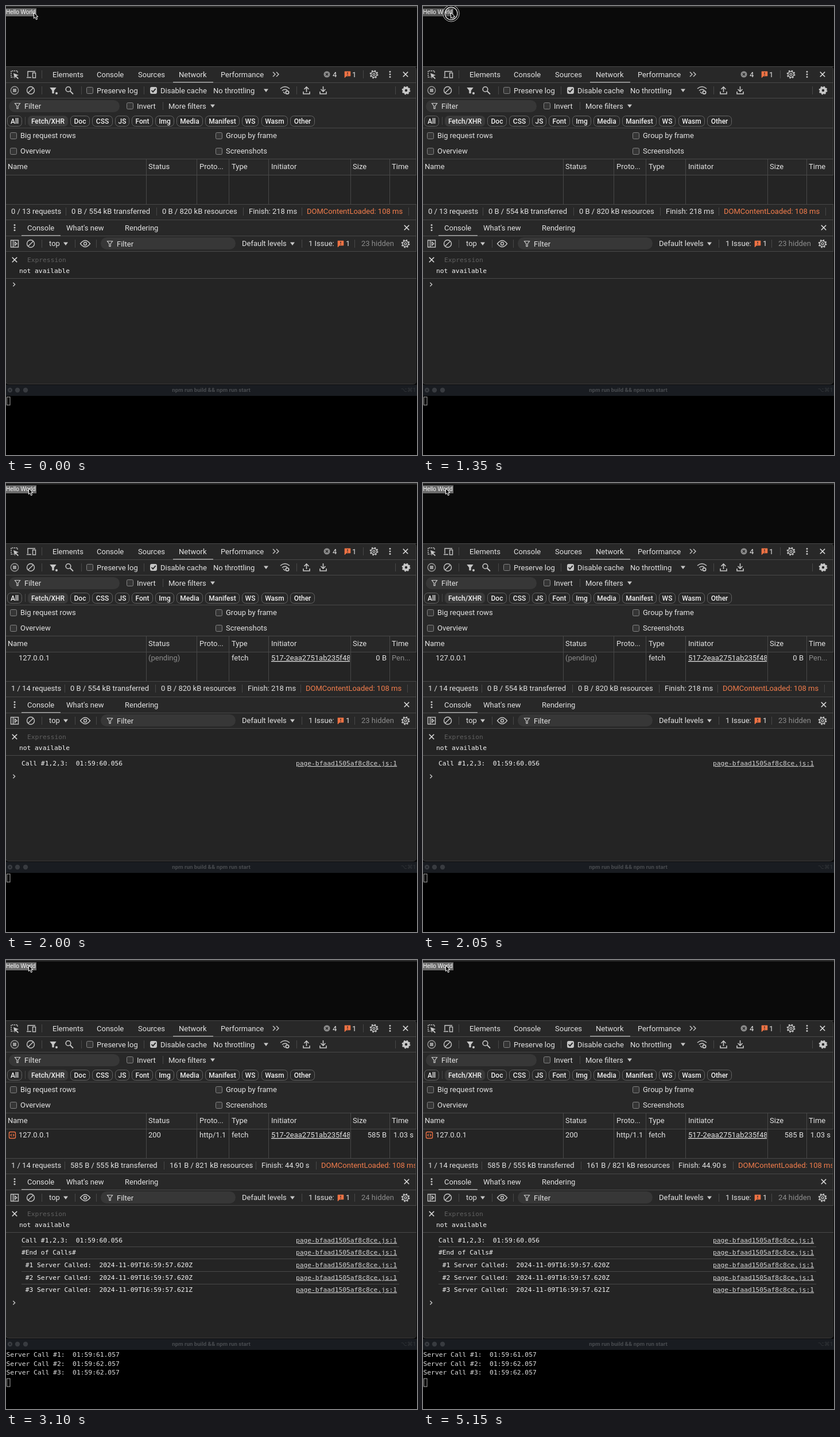
Animation, 716 px wide and 782 px high, one loop 5.2 s. Source, as an HTML page:

```html
<!DOCTYPE html>
<html lang="en">
<head>
<meta charset="utf-8">
<title>Network panel</title>
<style>
html, body { margin: 0; width: 100%; height: 100%; overflow: hidden; background: #000; }
svg { display: block; width: 716px; height: 782px; }
text { font: 13px Roboto, sans-serif; fill: #e3e3e3; white-space: pre; }
text.chip { font-size: 12px; font-weight: 500; fill: #f0f0f0; }
text.mono { font: 11.25px "DejaVu Sans Mono", monospace; fill: #f6f6f6; }
text.term { font: 11.3px "DejaVu Sans Mono", monospace; fill: #dedede; }
text.title { font-size: 9.7px; font-weight: 700; fill: #484b4f; text-anchor: middle; }
text.hint { font-size: 9.7px; fill: #33363a; text-anchor: middle; }
text.page { font: 10px "Liberation Sans", Arial, sans-serif; fill: #fff; }
text.dim { fill: #8c8c8c; }
text.faint { fill: #606060; }
text.hot { fill: #f27d4c; }
text.end { text-anchor: end; }
text.link { text-decoration: underline; text-decoration-thickness: 1px; }
text.mono.link { fill: #d4d4d4; }
</style>
</head>
<body>
<svg id="stage" viewBox="0 0 716 782"></svg>
<script>
const NS = 'http://www.w3.org/2000/svg';
const LOOP = 5200;
const PRESS = 550, RING = 600, RELEASE = 1700;
const REQUEST = 2000, ICON = 3000, RESPONSE = 3100;
const INK = '#c7c7c7', LINE = '#484848', HOT = '#ee7244';

const stage = document.getElementById('stage');
let layer = stage;

function add(tag, attrs, parent = layer) {
  const node = document.createElementNS(NS, tag);
  for (const key in attrs) node.setAttribute(key, attrs[key]);
  return parent.appendChild(node);
}

function group(draw) {
  const outer = layer;
  const node = add('g', {});
  layer = node;
  draw();
  layer = outer;
  return node;
}

const rect = (x, y, width, height, fill, more) => add('rect', { x, y, width, height, fill, ...more });
const circle = (cx, cy, r, more) => add('circle', { cx, cy, r, fill: 'none', stroke: INK, 'stroke-width': 1.4, ...more });
const path = (d, more) => add('path', { d, fill: 'none', stroke: INK, 'stroke-width': 1.4, ...more });
const hline = (y, x = 0, end = 715) => rect(x, y, end - x, 1, LINE);
const vline = (x, y, height) => rect(x, y, 1, height, LINE);
const divider = (x, cy) => vline(x, cy - 7, 14);

// Text is placed by its left edge and vertical middle.
function label(x, cy, text, cls = '') {
  const drop = /mono|term/.test(cls) ? 3 : 4;
  const node = add('text', { x, y: cy + drop, class: cls });
  node.textContent = text;
  return node;
}

const caret = (x, y) => path(`M${x - 4} ${y - 2.5}h8l-4 5.5z`, { fill: INK, stroke: 'none' });
const cross = (x, y, r = 4.2) => path(`M${x - r} ${y - r}l${2 * r} ${2 * r}m0 ${-2 * r}l${-2 * r} ${2 * r}`, { stroke: '#ddd', 'stroke-width': 1.6 });
const funnel = (x, y, fill = 'none') => path(`M${x - 4.5} ${y - 4.5}h9l-3.4 4.6v4.6h-2.2v-4.6z`, { fill, 'stroke-width': 1.2 });
const chevron = (x, y, r = 4) => path(`M${x - r / 2} ${y - r}l${r} ${r}l${-r} ${r}`);

function kebab(x, y) {
  for (const dy of [-4.5, 0, 4.5]) circle(x, y + dy, 1.5, { fill: INK, stroke: 'none' });
}

function gear(x, y, solid) {
  circle(x, y, solid ? 4.2 : 5, { 'stroke-width': solid ? 4 : 1.4 });
  circle(x, y, 6.4, { 'stroke-width': 2, 'stroke-dasharray': '2.51 2.51' });
  if (!solid) circle(x, y, 1.9, { 'stroke-width': 1.3 });
}

function clearIcon(x, y) {
  circle(x, y, 6.5);
  path(`M${x - 4.6} ${y + 4.6}l9.2 -9.2`);
}

function checkbox(x, y, on) {
  rect(x - 5.5, y - 5.5, 11, 11, on ? '#c4c4c4' : '#353535', { rx: 2, stroke: on ? '#c4c4c4' : '#858585' });
  if (on) path(`M${x - 3.5} ${y}l2.5 2.7l4.7 -5.5`, { stroke: '#222', 'stroke-width': 1.8 });
}

function issueBadge(x, y) {
  path(`M${x - 5} ${y - 5}h10v8h-7l-3 3z`, { fill: HOT, stroke: HOT, 'stroke-width': 0.6 });
  path(`M${x} ${y - 3.5}v3m0 1.2v1.3`, { stroke: '#2b2b2b' });
}

function pageArea() {
  rect(0, 0, 716, 106, '#0a0a0a');
  rect(0, 0, 716, 2.5, '#2b2b2b');
  rect(0, 4, 53, 14, '#6b6b6b', { id: 'button' });
  label(0, 10, 'Hello World', 'page');
}

function tabBar() {
  path('M20 116v-3h-11v11h4', { 'stroke-dasharray': '2.2 1.3' });
  path('M13 117l9 3.4l-4 1.5l4 4l-1.4 1.4l-4 -4l-1.5 3.5z', { fill: INK, stroke: 'none' });
  path('M38 123v-9h13M36 124.5h8');
  rect(46.5, 116.5, 5, 8.5, 'none', { stroke: INK, 'stroke-width': 1.4 });
  divider(62, 119);
  [[81, 'Elements'], [158, 'Console'], [230, 'Sources'], [301, 'Network'], [374, 'Performance']]
    .forEach(([x, name]) => label(x, 120, name));
  chevron(467, 119);
  chevron(473, 119);
  circle(559, 119, 5.5, { fill: '#8b8b8b', stroke: 'none' });
  path('M557 117l4 4m0 -4l-4 4', { stroke: '#282828' });
  label(569, 120, '4');
  issueBadge(595, 119);
  label(603, 120, '1');
  divider(622, 119);
  gear(641, 119);
  kebab(669, 119);
  cross(696, 119);
  hline(133);
  rect(291, 132, 70, 1.5, '#a5a5a5');
}

function networkTools() {
  circle(15, 147, 6.7, { stroke: '#999' });
  rect(12, 144, 6, 6, '#999');
  clearIcon(43, 147);
  divider(62, 147);
  funnel(82, 147, INK);
  circle(88, 152, 2, { fill: INK, stroke: 'none' });
  circle(108.5, 145, 4.3, { 'stroke-width': 1.6 });
  path('M111.5 148l5.5 5.5', { 'stroke-width': 1.8 });
  divider(131, 147);
  checkbox(146, 147);
  label(158, 147.5, 'Preserve log');
  divider(240, 147);
  checkbox(257, 147, true);
  label(269, 147.5, 'Disable cache');
  label(361, 147.5, 'No throttling');
  caret(453, 147);
  path('M478 144q8 -7 16 0M481 147.5q5 -4 9 -1M483 149.5l3 3');
  circle(490, 150.5, 2.7, { 'stroke-width': 1.8 });
  divider(506, 147);
  path('M518 149v4h11v-4M523.5 150v-9m-4 4l4 -4l4 4', { 'stroke-width': 1.6 });
  path('M547 149v4h11v-4M552.5 140v9m-4 -4l4 4l4 -4', { 'stroke-width': 1.6 });
  divider(678, 147);
  gear(697, 147, true);
  hline(160);
}

function filters() {
  rect(5, 164, 193, 21, '#373737', { rx: 10.5 });
  funnel(20, 174);
  label(32, 175, 'Filter');
  checkbox(216, 174);
  label(228, 175, 'Invert');
  divider(273, 174);
  label(283, 175, 'More filters');
  caret(360, 174);

  [[2, 26, 'All'], [38, 70, 'Fetch/XHR'], [112, 34, 'Doc'], [150, 36, 'CSS'], [190, 25, 'JS'],
    [219, 37, 'Font'], [260, 33, 'Img'], [297, 46, 'Media'], [347, 60, 'Manifest'],
    [411, 29, 'WS'], [445, 46, 'Wasm'], [495, 43, 'Other']].forEach(([x, w, name], i) => {
    const picked = i === 1;
    rect(x + 0.5, 191.5, w - 1, 18, picked ? '#3a3a3a' : 'none', { rx: 6, stroke: picked ? '#3a3a3a' : '#656565' });
    label(x + w / 2, 200.5, name, 'chip').setAttribute('text-anchor', 'middle');
  });
  divider(33, 200);
  hline(212);

  [[13, 226, 'Big request rows'], [371, 226, 'Group by frame'], [13, 253, 'Overview'], [371, 253, 'Screenshots']]
    .forEach(([x, y, name]) => {
      checkbox(x, y);
      label(x + 12, y, name);
    });
}

function table() {
  rect(0, 294, 715, 51, '#242424');
  hline(266);
  hline(294);
  [244, 332, 388, 457, 600, 668].forEach(x => vline(x, 266, 79));
  [[3, 'Name'], [248, 'Status'], [337, 'Proto...'], [393, 'Type'], [462, 'Initiator'], [604, 'Size'], [672, 'Time']]
    .forEach(([x, name]) => label(x, 280, name));
  hline(345);
  hline(372);
}

function consolePanel() {
  kebab(15, 386);
  label(37, 386.5, 'Console');
  label(105, 386.5, "What's new");
  label(207, 386.5, 'Rendering');
  cross(698, 386);
  hline(400);
  rect(27, 399, 68, 1.5, '#a5a5a5');

  rect(8.5, 408, 13, 12, 'none', { stroke: INK, 'stroke-width': 1.4 });
  path('M12.5 408v12M15.5 411l3.5 3l-3.5 3z');
  clearIcon(43, 414);
  divider(62, 414);
  label(75, 414, 'top');
  caret(104, 414);
  divider(120, 414);
  path('M129.5 414q8.5 -11 17 0q-8.5 11 -17 0z');
  circle(138, 414, 2.5);
  divider(157, 414);
  rect(165, 403, 235, 21, '#373737', { rx: 10.5 });
  funnel(181, 414);
  label(193, 414.5, 'Filter');
  label(411, 414, 'Default levels');
  caret(499, 414);
  divider(515, 414);
  label(527, 414, '1 Issue:');
  issueBadge(583, 414);
  label(592, 414, '1');
  divider(607, 414);
  gear(696, 414);

  rect(0, 428, 715, 230, '#242424', { rx: 5 });
  rect(0, 428, 715, 20, '#242424');
  hline(427);
  cross(15, 442);
  label(37, 443, 'Expression', 'mono faint');
  label(23, 462, 'not available', 'mono');
  hline(474);
}

function terminal() {
  rect(0, 660, 716, 19, '#191c21');
  [7, 20, 34].forEach(x => circle(x, 669, 4.2, { fill: '#383b40', stroke: 'none' }));
  path('M5.5 667.5l3 3m0 -3l-3 3', { stroke: '#191c21', 'stroke-width': 1 });
  label(357.5, 668, 'npm run build && npm run start', 'title');
  label(701, 668, '⌥⌘1', 'hint');
  rect(0, 679, 716, 103, '#000');
}

function statusBar(items, seps) {
  items.forEach(([x, text], i) => label(x, 358, text, i === 4 ? 'hot' : ''));
  seps.forEach(x => divider(x, 358));
}

function logLine(y, text) {
  label(27, y, text, 'mono');
  label(505, y, 'page-bfaad1505af8c8ce.js:1', 'mono link');
}

function requestRow() {
  label(22, 305, '127.0.0.1');
  label(393, 305, 'fetch');
  label(462, 305, '517-2eaa2751ab235f48', 'link').setAttribute('clip-path', 'url(#cell)');
  logLine(489, 'Call #1,2,3:  01:59:60.056');
}

const prompt = y => chevron(14, y, 3.3);
const termCursor = y => rect(1.5, y - 7, 5.5, 14, 'none', { stroke: '#aaa' });

function idleState() {
  statusBar([[9, '0 / 13 requests'], [114, '0 B / 554 kB transferred'], [272, '0 B / 820 kB resources'],
    [423, 'Finish: 218 ms'], [524, 'DOMContentLoaded: 108 ms']], [104, 262, 413, 515, 701]);
  prompt(485);
}

function pendingState() {
  statusBar([[9, '1 / 14 requests'], [112, '0 B / 554 kB transferred'], [270, '0 B / 820 kB resources'],
    [421, 'Finish: 218 ms'], [522, 'DOMContentLoaded: 108 ms']], [102, 260, 411, 513, 699]);
  label(248, 305, '(pending)', 'dim');
  label(663, 305, '0 B', 'end');
  label(672, 305, 'Pen...', 'dim');
  prompt(511);
}

function doneState() {
  group(() => statusBar([[9, '1 / 14 requests'], [112, '585 B / 555 kB transferred'], [285, '161 B / 821 kB resources'],
    [445, 'Finish: 44.90 s'], [549, 'DOMContentLoaded: 108 ms']], [102, 275, 435, 540]))
    .setAttribute('clip-path', 'url(#bar)');
  rect(5.5, 299.5, 11, 11, 'none', { rx: 2, stroke: HOT, 'stroke-width': 1.4 });
  path('M10 303l-2 2l2 2m2 -4l2 2l-2 2', { stroke: HOT, 'stroke-width': 1.1 });
  label(248, 305, '200');
  label(337, 305, 'http/1.1');
  label(663, 305, '585 B', 'end');
  label(710, 305, '1.03 s', 'end');
  [499, 520, 542, 564].forEach(y => hline(y, 27, 685));
  logLine(510, '#End of Calls#');
  ['620', '620', '621'].forEach((ms, i) => {
    logLine(532 + i * 21.5, ` #${i + 1} Server Called:  2024-11-09T16:59:57.${ms}Z`);
    label(0.5, 688 + i * 15.7, `Server Call #${i + 1}:  01:59:6${i ? 2 : 1}.057`, 'term');
  });
  prompt(597);
  termCursor(736);
}

function clipBox(id, x, y, width, height) {
  add('rect', { x, y, width, height }, add('clipPath', { id }));
}

clipBox('cell', 458, 295, 141, 49);
clipBox('bar', 0, 346, 713, 26);
rect(0, 0, 716, 782, '#0a0a0a');
pageArea();
terminal();
rect(-0.5, 105.5, 715, 553, '#282828', { rx: 5, stroke: '#3c3c3c' });
rect(0, 105, 12, 12, '#282828');
hline(105);
tabBar();
networkTools();
filters();
table();
consolePanel();

const idle = group(idleState);
const sent = group(requestRow);
const pending = group(pendingState);
const fileIcon = group(() => path('M6.5 299.5h6l3.5 3.5v8h-9.5zM12 299.5v4h4', { 'stroke-width': 1.2 }));
const done = group(doneState);
const waiting = group(() => termCursor(688));
const before = group(() => label(619, 414, '23 hidden', 'dim'));
const after = group(() => label(619, 414, '24 hidden', 'dim'));

const pointer = add('g', {});
layer = pointer;
const ring = group(() => {
  circle(1, 1, 12.5, { stroke: '#000', 'stroke-width': 3 });
  circle(1, 1, 14.2, { stroke: '#c8c8c8', 'stroke-width': 1 });
  circle(1, 1, 11, { stroke: '#e0e0e0', 'stroke-width': 1.3 });
});
path('M0.5 -0.5v10.2l2.3 -2.2l1.8 4.2l2 -0.9l-1.8 -4h3.2z', { fill: '#111', stroke: '#fff', 'stroke-width': 1 });

const button = document.getElementById('button');
const show = (node, on) => node.setAttribute('display', on ? 'inline' : 'none');
const within = (t, from, to) => t >= from && t < to;

function render(t) {
  const hasSent = t >= REQUEST, isDone = t >= RESPONSE;
  show(idle, !hasSent);
  show(sent, hasSent);
  show(pending, hasSent && !isDone);
  show(fileIcon, within(t, ICON, RESPONSE));
  show(done, isDone);
  show(waiting, !isDone);
  show(before, !isDone);
  show(after, isDone);

  // The button stays held until the pointer slips left on release.
  show(ring, within(t, RING, RELEASE));
  button.setAttribute('fill', within(t, PRESS, RELEASE) ? '#575757' : '#6b6b6b');
  pointer.setAttribute('transform', t < RELEASE ? 'translate(48 12)' : 'translate(39 10)');
}

const start = performance.now();
function tick() {
  render((performance.now() - start) % LOOP);
  requestAnimationFrame(tick);
}
tick();
</script>
</body>
</html>
```
